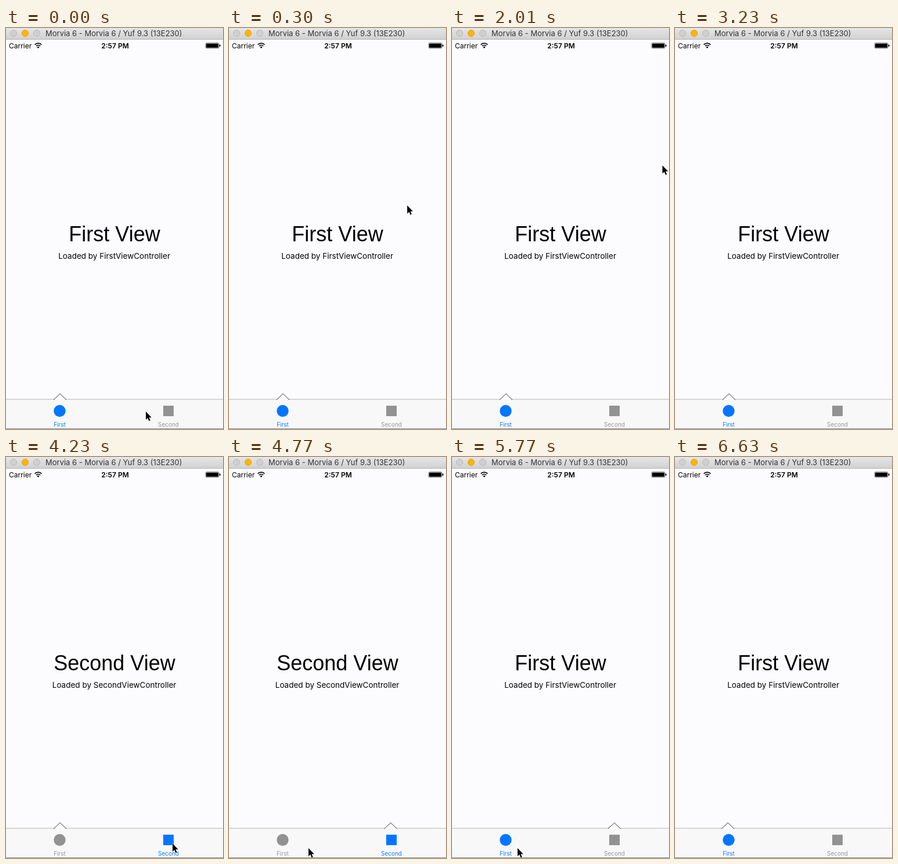
These frames come from a looping animation (374 px wide and 688 px high, 6650 ms). An HTML page:

```html
<!DOCTYPE html>
<html lang="en">
<head>
<meta charset="utf-8">
<title>Tab bar indicator</title>
<style>
  html, body { margin: 0; width: 100%; height: 100%; overflow: hidden; background: #fcfcfe; }
  svg { display: block; width: 100%; height: 100%; }
  text { font-family: Inter, Roboto, sans-serif; }
  .mid { text-anchor: middle; }
  #heading { font: 36px "Liberation Sans", Arial, sans-serif; }
  #detail { font-size: 13.5px; }
  .status { font-size: 12px; }
  .label { font-size: 10px; }
</style>
</head>
<body>
<svg viewBox="0 0 374 688">
  <defs>
    <linearGradient id="chrome" x2="0" y2="1">
      <stop offset="0" stop-color="#e6e6e7"/>
      <stop offset="1" stop-color="#d0d0d1"/>
    </linearGradient>
  </defs>
  <rect width="374" height="688" fill="#fcfcfe"/>

  <!-- window title bar -->
  <rect width="374" height="20" fill="url(#chrome)"/>
  <rect y="19" width="374" height="1" fill="#b4b4b4"/>
  <g stroke-width="1">
    <circle cx="13" cy="9" r="5.5" fill="#d0d0d0" stroke="#b8b8b8"/>
    <circle cx="33" cy="9" r="5.5" fill="#ffb400" stroke="#e5a000"/>
    <circle cx="53" cy="9" r="5.5" fill="#d0d0d0" stroke="#b8b8b8"/>
  </g>
  <text x="68" y="14" font-size="13" fill="#333">Morvia 6 - Morvia 6 / Yuf 9.3 (13E230)</text>

  <!-- status bar -->
  <text class="status" x="5" y="34.5">Carrier</text>
  <g fill="none" stroke="#000" stroke-width="1.6">
    <path d="M49.6 28.6a8.2 8.2 0 0 1 11.8 0M51.8 31a5.2 5.2 0 0 1 7.4 0"/>
    <path d="M55.5 35l-2-2.2a2.8 2.8 0 0 1 4 0z" fill="#000" stroke="none"/>
  </g>
  <text class="status mid" x="188" y="34.5" font-weight="600">2:57 PM</text>
  <rect x="344" y="25.7" width="23" height="9" rx="1.8" fill="#fcfcfe" stroke="#000" stroke-width=".6"/>
  <rect x="345" y="26.7" width="21" height="7" rx="1"/>
  <path d="M367.7 28.2a2 2 0 0 1 0 4z"/>

  <!-- page -->
  <text id="heading" class="mid" x="187" y="366"></text>
  <text id="detail" class="mid" x="186.6" y="396"></text>

  <!-- tab bar -->
  <rect y="637" width="374" height="51" fill="#f8f8f9"/>
  <rect y="636.5" width="374" height="1" fill="#b4b4b4"/>
  <rect y="687" width="374" height="1" fill="#858585"/>
  <g id="arrow">
    <path d="M-11 638L0 627.5L11 638z" fill="#fcfcfe"/>
    <path d="M-11 638L0 627.5L11 638" fill="none" stroke="#222" stroke-width=".9"/>
  </g>
  <circle id="icon0" cx="92.5" cy="657" r="10.2"/>
  <rect id="icon1" x="271" y="648" width="18" height="18"/>
  <text id="label0" class="label mid" x="92.5" y="683.5">First</text>
  <text id="label1" class="label mid" x="280" y="683.5">Second</text>

  <path id="cursor" d="M0 0V14L3.2 11L5.5 16.2L7.7 15.2L5.5 10.2H9.8z"
        stroke="#fff" stroke-width="1" paint-order="stroke"/>
</svg>
<script>
const LOOP = 6650;
const TO_SECOND = 4210, TO_FIRST = 5750, ARROW_DELAY = 15;
const ARROW_X = [93, 280];
const NAMES = ["First", "Second"];
const $ = id => document.getElementById(id);

// Each trip is a list of [ms, x, y]; the pointer is off stage between trips.
const trips = [
  [[0, 241, 658], [30, 241, 658], [320, 308, 300], [610, 366, 14], [750, 376, 3]],
  [[1870, 374, 130], [2200, 345, 400], [2530, 318, 690]],
  [[3230, 303, 690], [3560, 293, 670], [3830, 288, 664], [3930, 287, 663],
   [4430, 287, 663], [4770, 137, 671], [5200, 113, 671],
   [5870, 113, 671], [6210, 104, 690]]
];

const smooth = u => u * u * (3 - 2 * u);

function pointerAt(t) {
  const trip = trips.find(p => t >= p[0][0] && t < p[p.length - 1][0]);
  if (!trip) return null;
  const i = trip.findIndex(p => p[0] > t);
  const [t0, x0, y0] = trip[i - 1], [t1, x1, y1] = trip[i];
  const u = smooth((t - t0) / (t1 - t0));
  return [x0 + (x1 - x0) * u, y0 + (y1 - y0) * u];
}

// Lightly underdamped spring from 0 to 1.
function spring(ms) {
  if (ms <= 0) return 0;
  const s = ms / 1000, zeta = 0.8, omega = 7.3;
  const root = Math.sqrt(1 - zeta * zeta), a = omega * root * s;
  return 1 - Math.exp(-zeta * omega * s) * (Math.cos(a) + zeta / root * Math.sin(a));
}

function arrowAt(t) {
  const [a, b] = ARROW_X;
  const k = t < TO_FIRST
    ? spring(t - TO_SECOND - ARROW_DELAY)
    : 1 - spring(t - TO_FIRST - ARROW_DELAY);
  return a + (b - a) * k;
}

function draw(t) {
  const tab = t >= TO_SECOND && t < TO_FIRST ? 1 : 0;
  $("heading").textContent = NAMES[tab] + " View";
  $("detail").textContent = `Loaded by ${NAMES[tab]}ViewController`;
  for (const i of [0, 1]) {
    $("icon" + i).setAttribute("fill", i === tab ? "#0076ff" : "#929292");
    $("label" + i).setAttribute("fill", i === tab ? "#0a7cff" : "#979797");
  }
  $("arrow").setAttribute("transform", `translate(${arrowAt(t)})`);
  const pos = pointerAt(t);
  $("cursor").setAttribute("visibility", pos ? "visible" : "hidden");
  if (pos) $("cursor").setAttribute("transform", `translate(${pos})`);
}

const start = performance.now();
function tick() {
  draw((performance.now() - start) % LOOP);
  requestAnimationFrame(tick);
}
tick();
</script>
</body>
</html>
```
